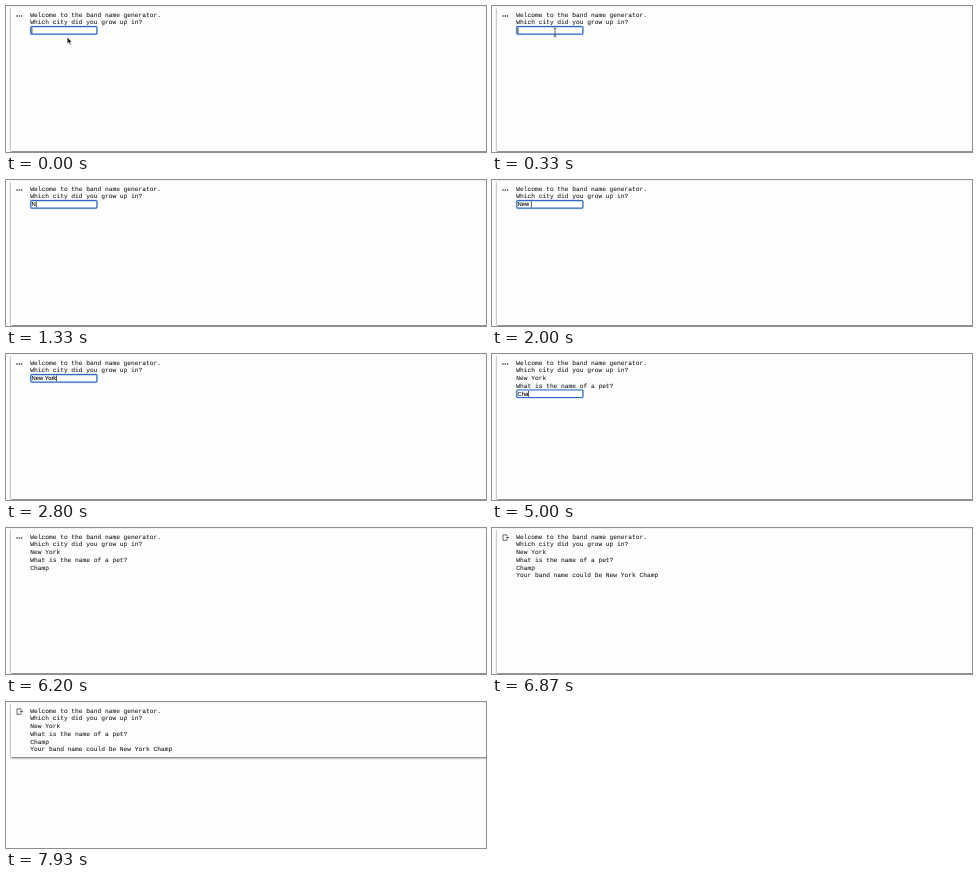
Write an HTML page that moves like this. It is 480 by 146 pixels and loops after 8 s.

```html
<!DOCTYPE html>
<html lang="en">
<head>
<meta charset="utf-8">
<title>Band name generator</title>
<style>
  html, body { margin: 0; width: 100%; height: 100%; overflow: hidden; background: #fdfdfd; }
  #stage { position: relative; width: 480px; height: 146px; overflow: hidden; }
  #card {
    position: absolute; left: 5px; top: 1px; width: 490px; background: #fdfdfd;
    box-shadow: 0 .7px 2px rgba(0, 0, 0, .62);
  }
  svg { position: absolute; left: 0; top: 0; }
  text { white-space: pre; text-rendering: geometricPrecision; }
  .out { font: 6.225px "Liberation Mono", "Courier New", monospace; fill: #1c1c1c; stroke: #1c1c1c; stroke-width: .06px; }
  .typed { font: 5.85px "Liberation Sans", Arial, sans-serif; fill: #000; stroke: #000; stroke-width: .08px; }
</style>
</head>
<body>
<div id="stage">
  <div id="card"></div>
  <svg width="480" height="146" viewBox="0 0 480 146">
    <g id="dots" fill="#222">
      <circle cx="11" cy="10" r=".8"/><circle cx="13.3" cy="10" r=".8"/><circle cx="15.6" cy="10" r=".8"/>
    </g>
    <g id="done" fill="none" stroke="#444" stroke-width=".8">
      <path d="M15 8V6.9H11V12.3H15V11.2"/>
      <path d="M13.6 9.6H16"/>
      <path d="M15.4 8.3L17.1 9.6L15.4 10.9Z" fill="#444" stroke="none"/>
    </g>
    <g id="lines"></g>
    <g id="field">
      <rect x="24.1" y="19.9" width="67.5" height="8.9" rx="1.6" fill="none" stroke="#b9d2f3" stroke-width=".7"/>
      <rect x="24.8" y="20.6" width="66.1" height="7.5" rx="1" fill="#fff" stroke="#2f6bbd" stroke-width="1.2"/>
      <text id="typed" class="typed" x="25.6" y="26.3"></text>
      <rect id="caret" y="21.5" width=".7" height="5.9" fill="#111"/>
    </g>
    <path id="arrow" d="M0 0V6.4L1.5 5L2.6 7.5L3.7 7L2.6 4.6H4.6Z" fill="#111" stroke="#fff" stroke-width=".4"/>
    <path id="beam" d="M-1.4 0Q0 0 0 1Q0 0 1.4 0M0 1V7.6M-1.4 8.6Q0 8.6 0 7.6Q0 8.6 1.4 8.6" fill="none" stroke="#222" stroke-width=".7"/>
  </svg>
</div>
<script>
const LOOP = 8000, LINE = 7.7, BLINK = 535;
const $ = id => document.getElementById(id);

// [time shown, text]
const output = [
  [0, "Welcome to the band name generator."],
  [0, "Which city did you grow up in?"],
  [3130, "New York"],
  [3330, "What is the name of a pet?"],
  [6200, "Champ"],
  [6470, "Your band name could be New York Champ"]
];

// Times of each key press, one per letter
const fields = [
  { from: 0, to: 3130, focus: 330, row: 0, word: "New York", keys: [1330, 1530, 1670, 1870, 2130, 2270, 2530, 2800] },
  { from: 3330, to: 6200, focus: 3330, row: 2, word: "Champ", keys: [4130, 4870, 5000, 5200, 5400] }
];

// [time, x, y] of the pointer before it becomes a text beam
const pointer = [[0, 61.3, 31.3], [70, 66, 27], [130, 69, 20], [200, 66, 18]];
const beamSpan = [330, 1330];

const rows = output.map(([at, str], i) => {
  const el = document.createElementNS("http://www.w3.org/2000/svg", "text");
  el.setAttribute("class", "out");
  el.setAttribute("x", 24.3);
  el.setAttribute("y", 10.7 + i * LINE);
  el.textContent = str;
  $("lines").append(el);
  return { at, el };
});

function show(el, on) { el.style.display = on ? "" : "none"; }
function move(el, x, y) { el.setAttribute("transform", `translate(${x} ${y})`); }

function drawField(t) {
  const f = fields.find(f => t >= f.from && t < f.to);
  show($("field"), f);
  if (!f) return;
  const pressed = f.keys.filter(k => k <= t);
  const last = pressed.length ? pressed[pressed.length - 1] : f.focus;
  move($("field"), 0, f.row * LINE);
  $("typed").textContent = f.word.slice(0, pressed.length);
  const width = pressed.length ? $("typed").getComputedTextLength() : 0;
  $("caret").setAttribute("x", 25.6 + width);
  show($("caret"), t < last || Math.floor((t - last) / BLINK) % 2 === 0);
}

function drawPointer(t) {
  const step = pointer.filter(p => p[0] <= t).pop();
  show($("arrow"), t < beamSpan[0]);
  show($("beam"), t >= beamSpan[0] && t < beamSpan[1]);
  move($("arrow"), step[1], step[2]);
  move($("beam"), 63, 22);
}

function draw(t) {
  rows.forEach(r => show(r.el, t >= r.at));
  drawField(t);
  drawPointer(t);
  show($("dots"), t < 6870);
  show($("done"), t >= 6870);
  $("card").style.height = (t < 7930 ? 144 : 54) + "px";
}

const start = performance.now();
function tick() {
  draw((performance.now() - start) % LOOP);
  requestAnimationFrame(tick);
}
draw(0);
requestAnimationFrame(tick);
</script>
</body>
</html>
```
